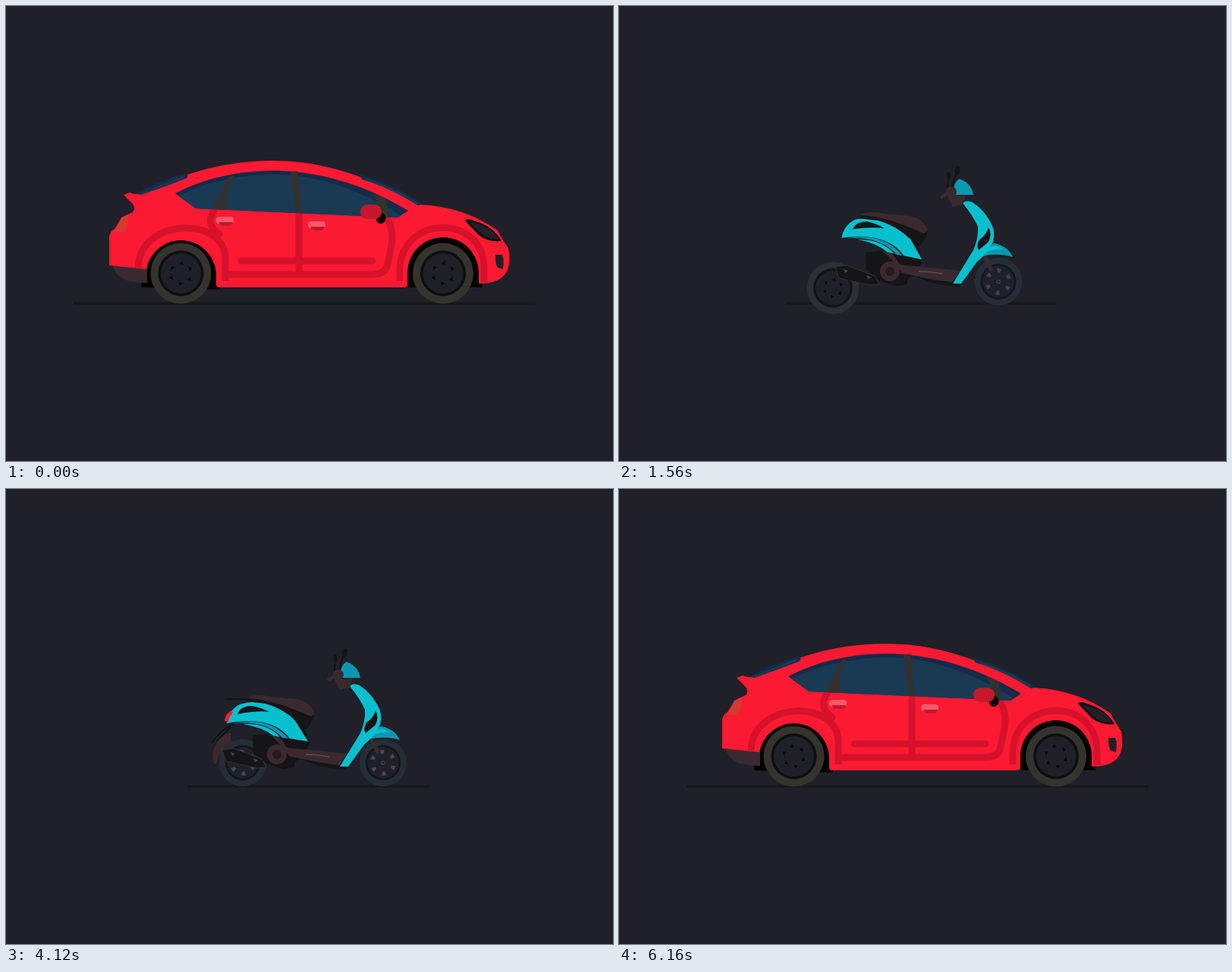
These frames come from a looping animation (800x600 px, 6.2 s). An HTML page:

```html
<!DOCTYPE html>
<html lang="en">
<head>
<meta charset="utf-8">
<title>Car and scooter</title>
<style>
html, body { margin: 0; width: 100%; height: 100%; overflow: hidden; background: #202029; }
svg { display: block; width: 800px; height: 600px; }
.red { fill: #fb1a32; } .deep { fill: #c4182c; } .brown { fill: #3a2a30; }
.black { fill: #000; } .coal { fill: #151517; } .bg { fill: #202029; }
.cyan { fill: #07c0cf; } .teal { fill: #0a98b0; } .glass { fill: #1a3a54; } .navy { fill: #152b49; }
.pillar { fill: #35312e; } .pink { fill: #f4596a; }
.seam { fill: none; stroke: #d6122b; stroke-width: 9; stroke-linecap: round; }
.wire { fill: none; stroke: #111; stroke-width: 1.5; stroke-linecap: round; }
</style>
</head>
<body>
<svg viewBox="0 0 800 600">
  <defs>
    <clipPath id="bodyClip"><polygon id="bodyEdge"/></clipPath>
    <clipPath id="glassClip"><rect id="glassEdge" y="150" height="250"/></clipPath>
  </defs>
  <line id="ground" y1="392" y2="392" stroke="#18181a" stroke-width="3.5"/>
  <g id="rearWell"><path class="black" d="M185 302 H277 L282 374 L178 371Z"/></g>
  <g id="frontWell"><path class="black" d="M532 302 H620 L628 371 H532Z"/></g>
  <g id="wedge"><path class="black" d="M470 315 L623 296 L575 371 H480Z"/></g>
  <g id="nose"><path class="black" d="M651 318 Q652 315 663 317 Q667 326 662 344 L658 346 Q652 335 651 318Z"/></g>
  <g id="rearBumper"><path class="brown" d="M140 340 L186 345 V365 Q164 364 157 361 Q143 355 140 340Z"/></g>

  <g clip-path="url(#bodyClip)"><g id="body">
    <path class="red" d="M155 249 L163 246 Q170 249 176 248 C230 221 290 204 350 204 C425 204 480 228 548 262
      Q604 265 648 296 Q655 310 662 319 Q666 337 660 350 Q652 366 623 366 V352 A47 47 0 0 0 529 352 V368 Q529 371 525 371
      H281 Q277 371 277 367 V352 A46.500 47 0 0 0 185 347 L136 342 V304 Q138 296 143 294 L152 280 Q161 274 167 272 Q172 266 166 260Z"/>
    <path fill="#d43a2e" d="M143 297 L152 279 L160 275 Q164 283 156 299Z"/>
    <g class="seam">
      <path stroke-linecap="butt" d="M174 345 C176 278 292 276 289 336 V363"/>
      <path stroke-linecap="butt" d="M519 363 V347 C522 274 631 274 630 347 V364"/>
      <path d="M274 270 C264 285 272 294 281 301"/>
      <path d="M291 354 H482 Q501 354 503 340 L508 316 Q512 294 500 276"/>
      <path d="M386 276 V348 M310 336 H483"/>
    </g>
    <path class="black" d="M605 283 Q608 279 616 283 Q642 290 653 310 Q636 312 623 302Z"/>
    <path class="bg" d="M609 284 Q642 290 650 308 Q636 309 625 300Z"/>
    <path class="bg" d="M645 328 H654 Q657 335 655 347 L648 345 Q645 342 645 328Z"/>
  </g></g>
  <g id="rearGlass"><path class="navy" d="M172 247 Q202 230 236 221 Q242 222 238 227 Q210 238 178 249Z"/>
    <path class="glass" d="M177 247 L233 224 L234 227 L179 248Z"/></g>
  <g id="windshield"><path class="navy" d="M465 222 Q510 234 550 261 L543 263 Q505 239 470 229Z"/>
    <path class="glass" d="M474 227 Q510 239 545 260 L541 261 Q510 243 474 229Z"/></g>
  <g clip-path="url(#glassClip)"><g id="windows">
    <path class="navy" d="M223 247 Q280 217 358 217 Q448 220 530 270 L516 279 L250 267Z"/>
    <path class="glass" d="M228 250 Q285 222 358 222 Q440 225 520 276 L516 279 L250 267Z"/>
    <path class="pillar" d="M294 225 L300 224 L290 248 L293 269 L273 268 Q279 250 294 225Z"/>
    <path class="pillar" d="M375 218 L384 218 L390 273 L382 272Z"/>
    <path class="pillar" d="M484 246 L500 254 L505 278 L498 279Z"/>
  </g></g>
  <g id="rearHandle"><rect class="pink" x="277" y="278" width="23" height="9" rx="4"/><path class="deep" d="M280 285 H299 Q298 290 294 290 H284Z"/></g>
  <g id="frontHandle"><rect class="pink" x="398" y="284" width="23" height="9" rx="4"/><path class="deep" d="M401 291 H420 Q419 296 415 296 H405Z"/></g>
  <g id="mirror"><ellipse class="black" cx="494" cy="280" rx="6.500" ry="7"/><rect class="deep" x="467" y="262" width="28" height="19" rx="9"/></g>

  <g id="tail"><path class="wire" d="M300 310 Q285 316 271 335 M289 277 H320 M296 314 L278 332"/></g>
  <g id="rearWheel"></g>
  <g id="frontWheel"></g>
  <g id="fender"><path class="brown" d="M290 331 Q296 320 315 318 Q330 318 336 326 L326 333 Q308 326 292 333Z"/></g>
  <g id="base"><path class="coal" d="M346 285 L406 300 L399 314 L394 317 Q400 330 397 342 L375 335 L352 318Z"/></g>
  <g id="engine">
    <path class="coal" d="M325 325 L362 321 L400 332 L394 355 L380 359 V367 L365 370 L343 362 L326 348Z"/>
    <path class="coal" stroke="#3b3b40" stroke-width=".7" d="M285 344 L300 342 L337 356 L343 367 L331 368 L290 359Z"/>
    <path fill="#3e4554" d="M296 347 L302 349 L298 352Z M326 355 L333 358 L328 360Z"/>
    <circle class="brown" cx="357" cy="350" r="13"/><circle fill="#241a1f" cx="357" cy="350" r="6"/>
    <path class="wire" d="M366 367 Q378 368 383 355"/>
  </g>
  <g id="floor">
    <path class="coal" d="M370 350 L400 355 L445 361 L450 370 Q418 369 400 360Z"/>
    <path class="brown" d="M346 322 Q362 324 369 340 Q375 343 390 343 L450 349 L439 364 Q410 361 373 352 Q366 340 346 322Z"/>
    <path fill="none" stroke="#604b53" stroke-width="1.500" d="M395 350 Q410 350 426 353"/>
  </g>
  <g id="rearShell">
    <path class="cyan" d="M291 309 Q293 292 308 284 Q325 279 342 282 Q368 288 382 307 L398 333 L374 329 Q350 298 291 309Z"/>
    <path class="teal" d="M298 309 Q347 299 372 329 L364 328 Q344 305 298 309Z"/>
    <path class="cyan" d="M312 310 Q345 309 361 327 L352 325 Q338 314 312 310Z"/>
    <path class="coal" d="M305 297 Q309 286 324 286 Q336 288 347 294 Q330 292 305 297Z"/>
  </g>
  <g id="lamp"><path class="red" d="M288 306 Q289 296 297 292 L299 295 Q294 301 293 307Z"/></g>
  <g id="seat">
    <path class="coal" d="M315 280 L325 275 L347 281 L407 294 L405 304 Q395 309 382 306 Q366 290 342 283Z"/>
    <path class="brown" d="M320 274 Q332 270 350 274 L383 277 Q402 281 407 296 L402 300 Q385 292 367 286 Q344 277 320 276Z"/>
  </g>
  <g id="guard">
    <path class="brown" d="M477 328 L484 327 L493 348 L489 350Z"/>
    <path class="teal" d="M478 330 Q485 314 495 313 Q512 316 519 331 Q500 325 478 330Z"/>
    <path class="cyan" d="M480 327 Q488 316 496 316 Q503 318 507 321 Q493 319 480 327Z"/>
  </g>
  <g id="leg">
    <path class="cyan" d="M453 260 Q457 255 466 259 Q480 268 489 284 Q497 297 493 311 Q485 327 472 337 L451 366 H440 L467 322 Q474 306 473 291 Q467 277 453 260Z"/>
    <path class="coal" d="M487 292 Q492 300 487 311 L474 322 Q470 317 475 308 Q484 302 487 292Z"/>
  </g>
  <g id="head">
    <path class="brown" d="M433 251 L457 250 L453 262 L440 265Z"/>
    <path class="teal" d="M440 249 Q441 231 449 228 Q464 233 467 249Z"/>
    <path stroke="#3a2a30" stroke-width="5" d="M424 253 L433 247"/>
    <circle class="brown" cx="438" cy="245" r="7"/>
  </g>
  <g id="mirrors"><path class="wire" d="M439 238 L444 222 M433 239 L434 226"/>
    <ellipse class="coal" cx="446" cy="217" rx="3.500" ry="6.500" transform="rotate(12 446 217)"/>
    <ellipse class="coal" cx="434" cy="224" rx="2.500" ry="5"/></g>
</svg>
<script>
const LOOP = 6200;
const $ = id => document.getElementById(id);
const mix = (a, b, p) => a + (b - a) * p;
const clamp = x => Math.max(0, Math.min(1, x));
const quad = p => p < .5 ? 2 * p * p : 1 - 2 * (1 - p) ** 2;
const cubic = p => p < .5 ? 4 * p ** 3 : 1 - 4 * (1 - p) ** 3;
const hump = (t, start, length) => Math.sin(Math.PI * clamp((t - start) / length));

// Goes 0 to 1 as the car becomes a scooter, then back to 0.
const change = (t, start, length, back, backLength, ease = quad) =>
  ease(clamp((t - start) / length)) - ease(clamp((t - back) / backLength));

// A part shows once the sweep passes its pivot; lead shifts that moment.
// away is the offset and turn it has when absent.
const carParts = {
  rearWell: { pivot: [180, 377], lead: -24 },
  frontWell: { pivot: [576, 371], lead: 100 },
  wedge: { pivot: [470, 371], lead: 260, away: [-20, 0, 0] },
  nose: { pivot: [658, 332], lead: 274, away: [64, 2, 0] },
  rearBumper: { pivot: [150, 350], lead: -11, away: [0, 8, 26] },
  rearGlass: { pivot: [176, 248], lead: -200, away: [0, 0, -45] },
  windshield: { pivot: [466, 223], lead: 74, away: [2, 4, -14], sway: [0, -8] },
  rearHandle: { pivot: [288, 284], lead: -80, away: [20, 2, 0], sway: [7, 0] },
  frontHandle: { pivot: [409, 290], lead: -60, away: [20, 2, 0], sway: [7, 0] },
  mirror: { pivot: [481, 272], lead: 120, away: [40, 4, 0] }
};
const scooterParts = {
  tail: { pivot: [300, 310], lift: 4, away: [10, 20, -60] },
  fender: { pivot: [312, 361], sway: [0, -60] },
  base: { pivot: [385, 320], lead: 148, lift: 2, away: [45, 16, 30] },
  engine: { pivot: [370, 360], lead: 140, away: [25, 14, 10] },
  floor: { pivot: [440, 360], lead: 90, away: [45, 20, 6] },
  rearShell: { pivot: [390, 328], lift: 4, away: [15, 10, 25] },
  lamp: { pivot: [294, 304], lift: 4 },
  seat: { pivot: [400, 300], lift: 4, away: [20, 15, 20] },
  guard: { pivot: [490, 330], lead: -30, away: [25, 15, 30] },
  leg: { pivot: [445, 366], lead: 89, away: [36, 9, 40] },
  head: { pivot: [450, 258], lead: 10, lift: 3.5, away: [20, 10, 40] },
  mirrors: { pivot: [439, 240], lift: 7, away: [5, 5, 30] }
};

function place(id, { pivot: [x, y], away = [0, 0, 0], sway = [0, 0] }, shown, lift, swing) {
  const [dx, dy, turn] = away.map(v => v * (1 - shown));
  const scale = 1 - (1 - shown) ** 3;
  const el = $(id);
  el.style.display = shown > 0 ? "" : "none";
  el.setAttribute("transform", `translate(${x + dx + sway[0] * swing} ${y + dy + lift}) ` +
    `rotate(${turn + sway[1] * swing}) scale(${scale}) translate(${-x} ${-y})`);
}

const ring = (count, shape) =>
  Array.from({ length: count }, (_, i) => `<path transform="rotate(${i * 360 / count})" d="${shape}"/>`).join("");

for (const id of ["rearWheel", "frontWheel"]) {
  $(id).innerHTML = `<circle class="tyre" r="40"/><circle class="rim" r="30"/><circle class="bg" r="26.500"/>
    <g class="holes" fill="#050506">${ring(6, "M-3 -13 L2 -16 L3 -11Z")}</g>
    <g class="alloy" fill="#3f4a5d">${ring(6, "M-4 -22 L4 -22 L2 -15 L-2 -15Z")}<circle r="3.500"/><circle class="bg" r="2"/></g>`;
}

function drawWheel(id, carX, scooterX, p, t) {
  const x = mix(carX, scooterX, p);
  const y = mix(352.5, 361, p) + 15 * Math.sin(Math.PI * p) ** .8;
  const tone = (a, b) => Math.round(mix(a, b, p));
  const alloy = clamp((p - .7) / .3);
  const el = $(id);
  el.setAttribute("transform", `translate(${x} ${y}) rotate(${t / LOOP * 360 * 6}) scale(${mix(40, 31, p) / 40})`);
  el.querySelector(".tyre").setAttribute("fill", `rgb(${tone(53, 36)},${tone(51, 46)},${tone(45, 55)})`);
  el.querySelector(".rim").setAttribute("fill", `rgb(${tone(14, 20)},${tone(14, 22)},${tone(15, 31)})`);
  el.querySelector(".alloy").setAttribute("opacity", alloy);
  el.querySelector(".holes").setAttribute("opacity", 1 - alloy);
}

function drawCar(t) {
  const edge = mix(700, 120, change(t, 690, 880, 4477, 643));
  const gone = (700 - edge) / 464;
  const lean = 162 * gone ** 2;
  const landing = hump(t, 5050, 780);
  const drop = 6 * gone - 2 * (landing + hump(t, 0, 780));
  for (const id of ["body", "windows"]) $(id).setAttribute("transform", `translate(0 ${drop})`);
  $("bodyEdge").setAttribute("points", `0,200 ${edge - lean},200 ${edge},308 ${edge + 5},400 0,400`);
  $("glassEdge").setAttribute("width", edge + 22 + lean * .22);
  for (const [id, part] of Object.entries(carParts)) {
    place(id, part, clamp((edge - part.pivot[0] + part.lead) / 160), drop, landing);
  }
}

function drawScooter(t) {
  const sweep = mix(534, 190, change(t, 960, 1000, 4210, 700));
  const rise = hump(t, 1950, 2300) ** 2;
  for (const [id, part] of Object.entries(scooterParts)) {
    const { pivot, lead = 0, lift = 0 } = part;
    place(id, part, clamp((pivot[0] + lead - sweep) / 100), -lift * rise, (1 - rise) ** 2);
  }
}

function draw(t) {
  const ride = change(t, 947, 900, 4405, 900, cubic);
  $("ground").setAttribute("x1", mix(89, 239, ride));
  $("ground").setAttribute("x2", mix(698, 558, ride));
  drawWheel("rearWheel", 230.5, 312, change(t, 990, 1000, 4300, 710), t);
  drawWheel("frontWheel", 576, 497, change(t, 700, 1000, 4428, 710), t);
  drawCar(t);
  drawScooter(t);
}

const began = performance.now();
function tick() {
  draw((performance.now() - began) % LOOP);
  requestAnimationFrame(tick);
}
tick();
</script>
</body>
</html>
```
